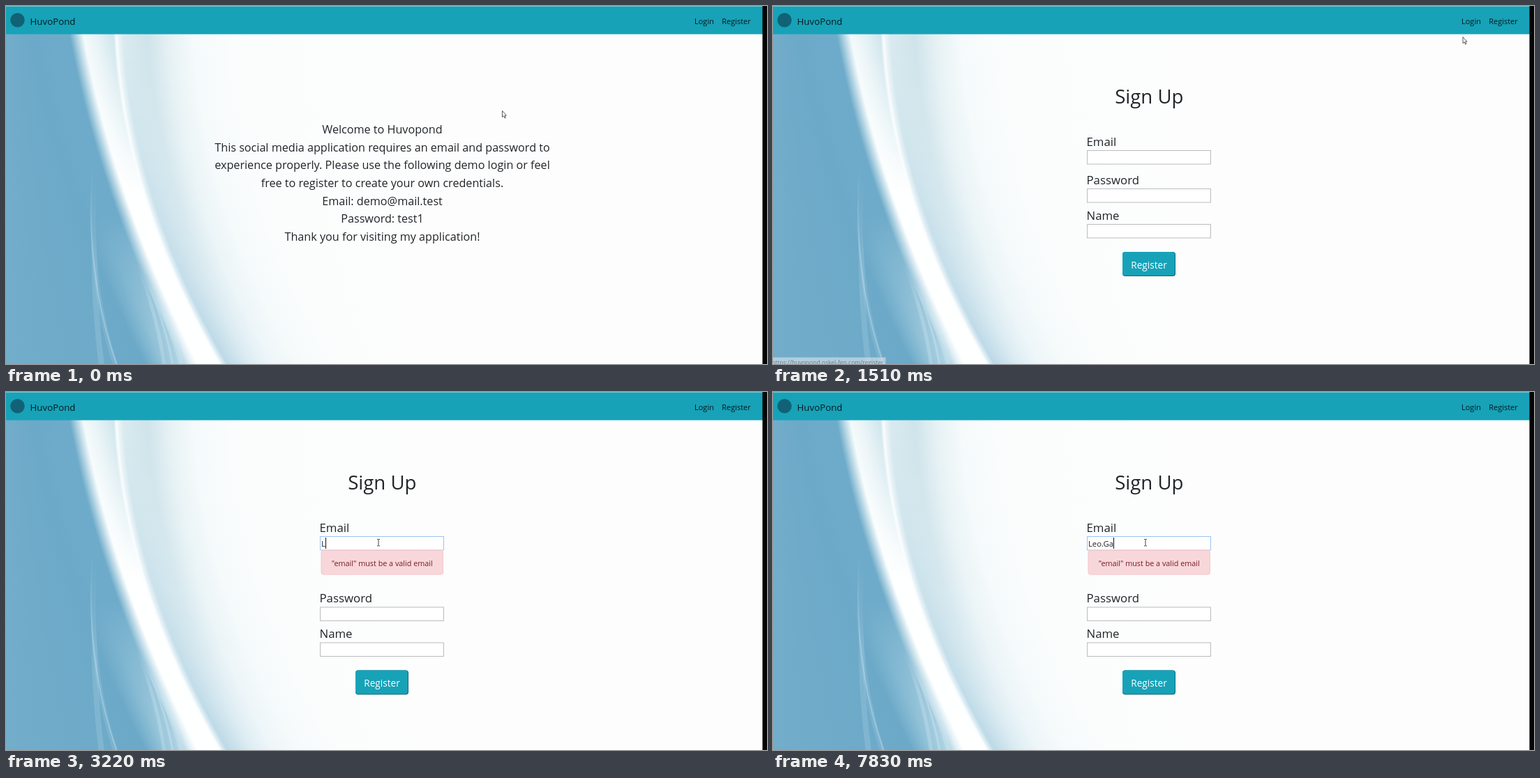
Write an HTML page with a canvas that moves like this. It is 1091 px wide and 514 px high and loops after 8 s.

```html
<!DOCTYPE html>
<html lang="en">
<head>
<meta charset="utf-8">
<title>Sign up</title>
<style>
  html, body { margin: 0; width: 100%; height: 100%; overflow: hidden; background: #fdfdfd; }
  canvas, svg { position: absolute; left: 0; top: 0; }
  text { font-family: "Open Sans", "Noto Sans", sans-serif; fill: #212529; white-space: pre; }
  .welcome { font-size: 16.17px; text-anchor: middle; }
  .label { font-size: 16.8px; }
  .nav { font-size: 11px; fill: #06181c; }
  .field { fill: #fff; stroke: #bcbcc0; }
  .focus { stroke: #9cc3ee; }
</style>
</head>
<body>
<canvas id="bg" width="1091" height="514"></canvas>
<svg width="1091" height="514" viewBox="0 0 1091 514">
  <rect width="1085" height="40.5" fill="#17a2b8"/>
  <rect width="1085" height="1" fill="#74c3d0"/>
  <rect x="1084.5" width="7" height="514" fill="#050505"/>
  <circle cx="16.5" cy="20.3" r="10.3" fill="#116276"/>
  <text x="34.5" y="26.5" style="font-size:13.3px;fill:#06181c">HuvoPond</text>
  <text class="nav" x="987" y="25.5">Login</text>
  <text class="nav" x="1026.2" y="25.5">Register</text>

  <g id="home"></g>

  <g id="form">
    <text x="539.3" y="140" text-anchor="middle" style="font-size:27.6px">Sign Up</text>
    <text class="label" x="449.5" y="201">Email</text>
    <rect id="email" class="field" x="450.5" y="207.5" width="177" height="19.5"/>
    <text id="typed" x="452" y="222" style="font-size:11.3px"></text>
    <rect id="caret" y="209" width="1" height="16" fill="#111"/>
    <g id="error">
      <rect x="452" y="227.5" width="174.5" height="34.5" rx="3" fill="#f8d7da" stroke="#f5c6cb"/>
      <text x="539.3" y="249.7" text-anchor="middle" style="font-size:10.8px;fill:#721c24">"email" must be a valid email</text>
    </g>
    <g id="rest">
      <text class="label" x="449.5" y="255.5">Password</text>
      <rect class="field" x="450.5" y="262.5" width="177" height="19.5"/>
      <text class="label" x="449.5" y="306.5">Name</text>
      <rect class="field" x="450.5" y="313.5" width="177" height="19.5"/>
      <rect x="501" y="353" width="76" height="35" rx="4" fill="#0f6878"/>
      <rect x="501" y="353" width="75" height="34" rx="4" fill="#17a2b8"/>
      <text x="539" y="376.7" text-anchor="middle" style="font-size:13.6px;fill:#fff">Register</text>
    </g>
  </g>

  <g id="status">
    <path d="M0 504.5H161.5V514" fill="#dfe3e8" stroke="#b9bec4"/>
    <rect y="505" width="161" height="9" fill="#dfe3e8"/>
    <text x="158.5" y="515" text-anchor="end" style="font-size:8.5px;fill:#5b6066">https://huvopond.oskel-fen.com/register</text>
  </g>

  <g id="pointer" stroke-linejoin="round">
    <path id="arrow" d="M.5 .5V9.6L2.6 7.7L4.1 11L5.4 10.4L4 7.2H6.4Z" fill="#fff" stroke="#333" stroke-width=".8"/>
    <path id="hand" d="M1.2 1.2C1.2 .2 2.8 .2 2.8 1.2V5L6.4 5.7Q7.3 6 7.2 7L6.5 10V12.5H2V10.7L-.9 7.6C-1.5 6.6 -.3 6 .3 6.7L1.2 7.6Z" fill="#fff" stroke="#222" stroke-width=".8"/>
    <path id="beam" d="M-2 -4.5H-.5L0 -4L.5 -4.5H2M0 -4V4.5M-2 5H-.5L0 4.5L.5 5H2" fill="none" stroke="#333" stroke-width=".9"/>
  </g>
</svg>
<script>
const $ = id => document.getElementById(id);
const show = (id, on) => $(id).style.display = on ? "" : "none";

$("home").innerHTML = [
  "Welcome to Huvopond",
  "This social media application requires an email and password to",
  "experience properly. Please use the following demo login or feel",
  "free to register to create your own credentials.",
  "Email: demo@mail.test",
  "Password: test1",
  "Thank you for visiting my application!"
].map((s, i) => `<text class="welcome" x="539.5" y="${183.2 + i * 25.6}">${s}</text>`).join("");

// Backdrop: one horizontal gradient per row, following two curved edges
function paintBackdrop() {
  const c = $("bg").getContext("2d");
  const mix = (a, b, k) => `rgb(${a.map((v, i) => v + (b[i] - v) * k)})`;
  const white = [254, 255, 255], blue = [110, 171, 202];
  for (let y = 40; y < 514; y++) {
    const u = y - 40, k = u / 474;
    const left = 101 + .18 * u + .00035 * u * u;
    const right = 158 + .05 * u + .00056 * u * u;
    const merge = Math.min(1, u / 230);
    const haze = Math.max(0, (k - .55) / .45);
    const g = c.createLinearGradient(0, 0, 600, 0);
    const stop = (x, colour) => g.addColorStop(x / 600, colour);
    stop(0, "#72adca");
    stop(left - 65, "#6ca9c8");
    stop(left - 36, mix(blue, [152, 198, 218], haze));
    stop(left - 10, mix(blue, [182, 214, 228], haze));
    stop(left, mix([179, 212, 227], [226, 240, 246], haze));
    stop(left + 10, mix([244, 250, 251], white, merge));
    stop(left + (right - left) * .5, mix([232, 243, 246], white, merge));
    stop(right - 4, mix([208, 230, 237], white, merge));
    stop(right, "#fbfdfe");
    stop(right + 3, mix([236, 245, 248], [226, 240, 246], k));
    stop(right + 10, mix([218, 235, 240], [188, 217, 231], k));
    stop(right + 45, mix([207, 228, 234], [222, 237, 243], k));
    stop(right + 75, mix([230, 241, 244], [238, 246, 249], k));
    stop(right + 110, "#f5fafb");
    stop(right + 175, "#fbfdfd");
    stop(600, "#fdfdfd");
    c.fillStyle = g;
    c.fillRect(0, y, 1085, 1);
  }
  const streak = (width, alpha, x0, y0, cx, cy, x1) => {
    c.lineWidth = width;
    const g = c.createLinearGradient(0, y0, 0, 514);
    g.addColorStop(0, "rgba(220,240,248,0)");
    g.addColorStop(.4, `rgba(220,240,248,${alpha})`);
    g.addColorStop(1, `rgba(220,240,248,${alpha})`);
    c.strokeStyle = g;
    c.beginPath();
    c.moveTo(x0, y0);
    c.quadraticCurveTo(cx, cy, x1, 516);
    c.stroke();
  };
  streak(2, .3, 124, 235, 113, 385, 159);
  streak(7, .12, 127, 250, 117, 395, 157);
  streak(8, .16, 126, 330, 126, 430, 137);
  streak(5, .25, 188, 370, 216, 440, 227);
  streak(3, .3, 194, 380, 228, 450, 239);
  streak(7, .3, 202, 395, 238, 460, 252);
}
paintBackdrop();

// start, end, steps, from x, y, to x, y
const moves = [
  [100, 810, 8, 711, 150, 1013, 26],
  [940, 1370, 5, 1013, 26, 1038, 27],
  [1510, 2130, 7, 1064, 16, 536, 212],
  [2280, 2450, 3, 536, 212, 534, 216]
];

// time, text, caret visible
const typing = [
  [0, "", 0], [2280, "", 1], [2780, "", 0],
  [3220, "L", 1], [3330, "Le", 1], [3580, "Leo", 1], [3890, "Leo", 0],
  [4430, "Leo", 1], [4660, "Leos", 1], [4980, "Leos", 0],
  [5410, "Leo", 1], [5510, "Leo", 0],
  [5850, "Leo.", 1], [6110, "Leo.", 0], [6530, "Leo.", 1], [7070, "Leo.", 0],
  [7490, "Leo.", 1], [7590, "Leo.G", 1], [7830, "Leo.Ga", 1]
];

function pointerAt(t) {
  const move = moves.filter(m => m[0] <= t).pop();
  if (!move) return [711, 150];
  const [start, end, n, x0, y0, x1, y1] = move;
  const step = Math.min(n, 1 + Math.floor((t - start) / (end - start) * (n - 1) + .05));
  return [x0 + (x1 - x0) * step / n, y0 + (y1 - y0) * step / n];
}

function draw(t) {
  const signup = t >= 1510, invalid = t >= 3220;
  const [x, y] = pointerAt(t);
  const beam = t >= 2130, hand = !signup && x > 1021;

  show("home", !signup);
  show("form", signup);
  show("error", invalid);
  $("rest").setAttribute("transform", `translate(0 ${invalid ? 46.5 : 0})`);
  $("email").classList.toggle("focus", t >= 2130);

  show("status", hand || signup && t < 1610);
  $("status").style.opacity = signup ? .6 : 1;

  show("arrow", !beam && !hand);
  show("hand", hand);
  show("beam", beam);
  $("pointer").setAttribute("transform", `translate(${x} ${y})`);

  const [, text, on] = typing.filter(k => k[0] <= t).pop();
  $("typed").textContent = text;
  show("caret", on);
  if (signup) $("caret").setAttribute("x", Math.round(452 + (text ? $("typed").getComputedTextLength() : 0)));
}

const begin = performance.now();
function frame() {
  draw((performance.now() - begin) % 8000);
  requestAnimationFrame(frame);
}
frame();
</script>
</body>
</html>
```
